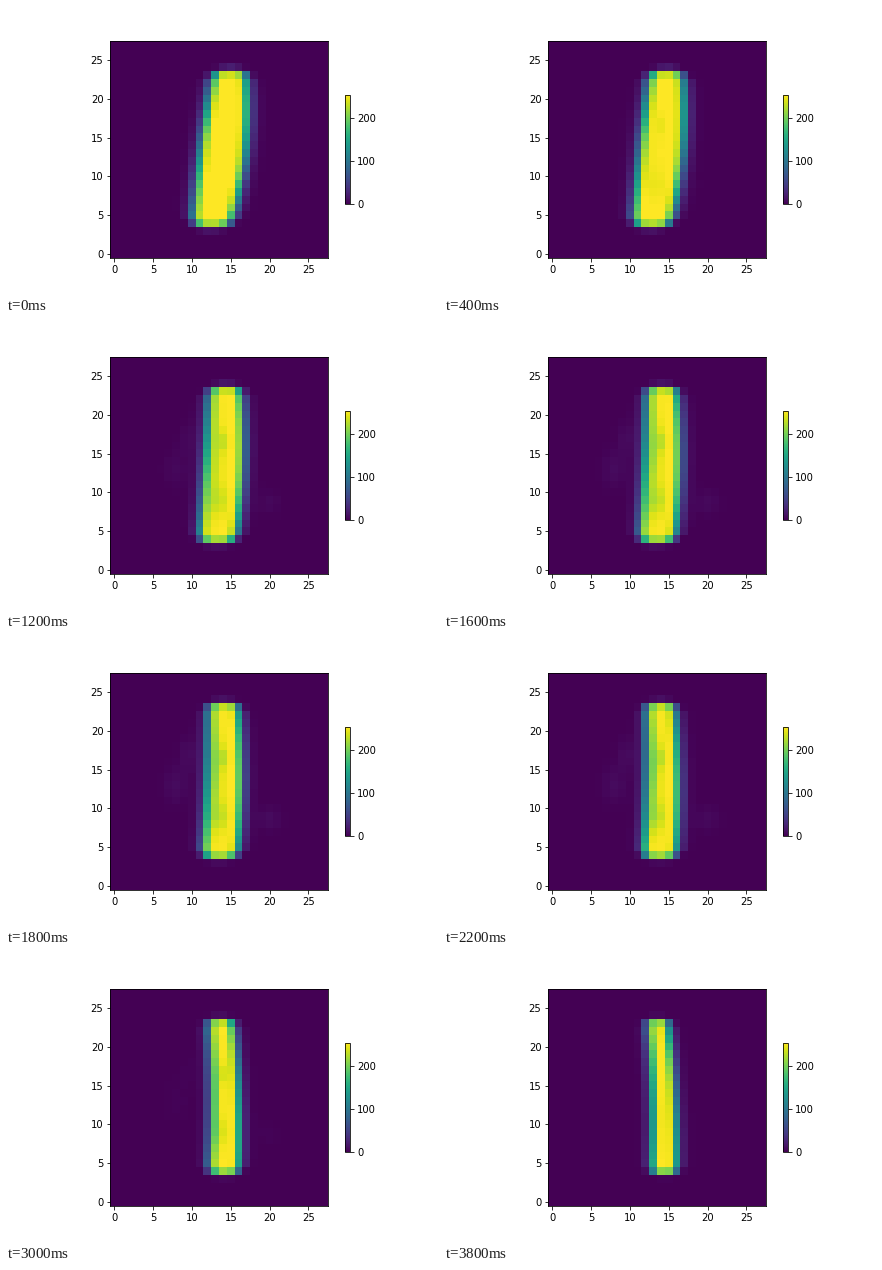
Recreate the animation shown at these times as a matplotlib script. Size 432 by 288 pixels, loop 4.2 s.

```python
import matplotlib.pyplot as plt
import numpy as np
from matplotlib.animation import FuncAnimation

STEP_MS, STEPS = 200, 21
LAST = 19  # the final pose is held for one extra step
SIZE, VMAX = 28, 254
MID_ROW, REACH = 13.55, 9.5

rows, cols = np.mgrid[0:SIZE, 0:SIZE]
u = (rows - MID_ROW) / REACH  # -1 at the foot of the stroke, 1 at its top


def sigmoid(x):
    return 1 / (1 + np.exp(-x))


def blob(row, col, height, width):
    return np.exp(-(((rows - row) / height) ** 2 + ((cols - col) / width) ** 2) / 2)


def stroke(p):
    """A soft-edged bar that straightens and thins as p goes from 0 to 1."""
    slant = 1.14 - 2.3 * p + 0.75 * p**2
    center = 14.08 + 0.27 * p + slant * u - 0.33 * u**2
    half = 2.85 - 1.45 * p - 0.17 * u - 0.6 * (1 - p) ** 2 * u**2
    soft = 0.44 - 0.06 * p
    d = cols - center
    sides = sigmoid((d + half) / soft) * sigmoid((half - d) / soft)
    ends = 9.97 - 0.15 * p - 0.07 * d**2 - np.abs(rows - MID_ROW)
    return np.minimum(1.06 * sides, 1) * sigmoid((5 + p) * ends)


def digit(step):
    p = min(step, LAST) / LAST
    swell = np.sin(np.pi * p)
    dips = 0.13 * blob(14.5, 13, 4.5, 0.6) * swell**2
    dips += 0.09 * (blob(16.5, 14, 0.9, 0.5) + blob(9, 13.5, 1.2, 0.8)) * swell
    haze = blob(13, 8, 1.8, 1.1) + blob(17, 9.5, 1.5, 0.8) + blob(8.7, 20, 1.1, 1.1)
    return VMAX * np.clip(stroke(p) * (1 - dips) + 0.03 * swell**2 * haze, 0, 1)


plt.rcParams["font.family"] = "DejaVu Sans"
fig, ax = plt.subplots(figsize=(6, 4), dpi=72)
fig.subplots_adjust(bottom=0.125)
image = ax.imshow(digit(0), origin="lower", cmap="viridis",
                  vmin=0, vmax=VMAX, interpolation="nearest")
fig.colorbar(image, shrink=0.5)


def update(step):
    image.set_data(digit(step))
    return [image]


anim = FuncAnimation(fig, update, frames=STEPS, interval=STEP_MS, repeat=True)
plt.show()
```
